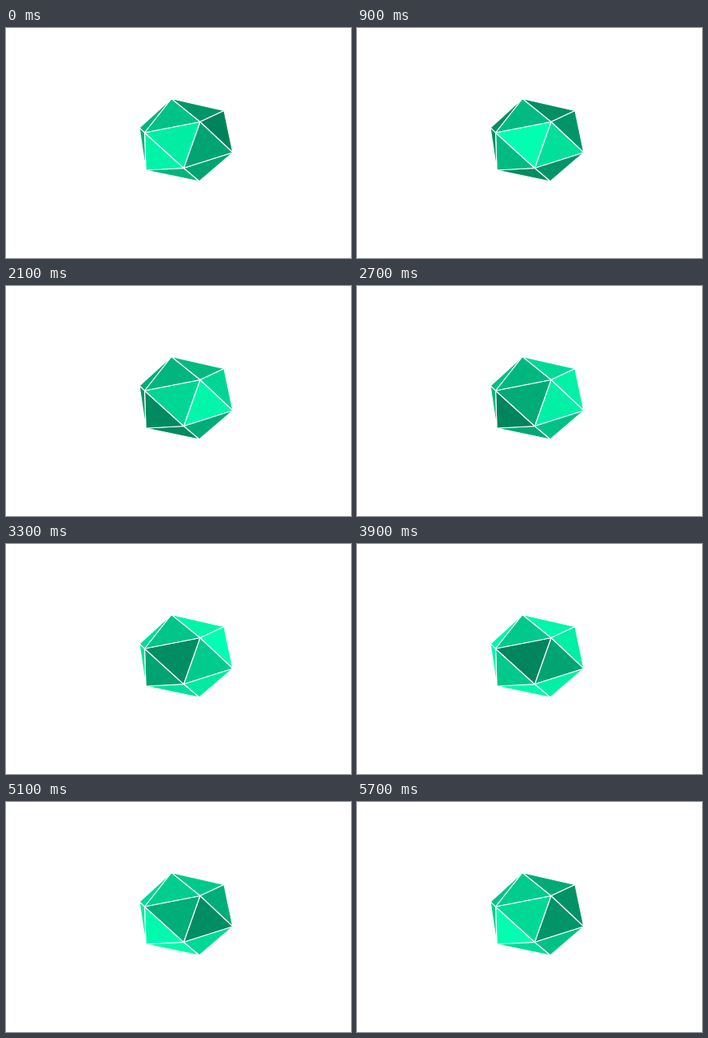
These frames come from a looping animation (432x288 px, 6 s). An HTML page:

```html
<!DOCTYPE html>
<html lang="en">
<head>
<meta charset="utf-8">
<title>Icosahedron</title>
<style>
  html, body { margin: 0; width: 100%; height: 100%; overflow: hidden; background: #fff; }
  svg { display: block; width: 432px; height: 288px; }
  polygon { stroke: #fff; stroke-width: 1.2; stroke-linejoin: round; }
</style>
</head>
<body>
<svg id="stage" viewBox="0 0 432 288"></svg>
<script>
const LOOP = 6000, HALF = LOOP / 2, STEP = 300;
const MID = 194;

const points = {
  A: [207, 88.5], B: [273, 103.5], C: [284, 156],
  D: [242, 192], E: [175, 178], F: [167, 125],
  G: [173.5, 131], H: [243, 117.5], I: [222.5, 175.5]
};

// Green level of each face at the key times; the second half mirrors it around MID.
const times = [0, 900, 2100, 2700];
const faces = {
  ABH: [149, 142, 186, 218],
  BCH: [131, 149, 214, 242],
  HCI: [164, 224, 247, 240],
  ICD: [164, 148, 172, 194],
  EID: [182, 140, 138, 168],
  GIE: [244, 187, 138, 132],
  GHI: [238, 255, 214, 171],
  AHG: [194, 187, 182, 184],
  FAG: [182, 142, 172, 192],
  FGE: [176, 140, 152, 182]
};

function key(levels, i) {
  const n = times.length, turn = Math.floor(i / n), k = i - turn * n;
  const sign = turn % 2 ? -1 : 1;
  return { t: times[k] + turn * HALF, v: sign * (levels[k] - MID) };
}

const slope = (a, b) => (b.v - a.v) / (b.t - a.t);

// Cubic Hermite curve through the periodic keys.
function level(levels, t) {
  let i = 0;
  while (key(levels, i + 1).t <= t) i++;
  const [a, b, c, d] = [-1, 0, 1, 2].map(j => key(levels, i + j));
  const span = c.t - b.t, u = (t - b.t) / span, w = 1 - u;
  const v = w * w * (1 + 2 * u) * b.v + u * u * (3 - 2 * u) * c.v
    + span * u * w * (w * slope(a, c) - u * slope(b, d));
  return Math.max(130, Math.min(255, MID + v));
}

const stage = document.getElementById("stage");
const shapes = Object.entries(faces).map(([name, levels]) => {
  const el = document.createElementNS(stage.namespaceURI, "polygon");
  el.setAttribute("points", [...name].map(p => points[p]).join(" "));
  stage.append(el);
  return { el, levels };
});

function draw(t) {
  for (const { el, levels } of shapes) {
    const g = level(levels, t);
    el.setAttribute("fill", `rgb(0,${Math.round(g)},${Math.round(g * 0.69)})`);
  }
}

const start = performance.now();
function tick() {
  const t = (performance.now() - start) % LOOP;
  draw(Math.floor(t / STEP) * STEP);
  requestAnimationFrame(tick);
}
tick();
</script>
</body>
</html>
```
